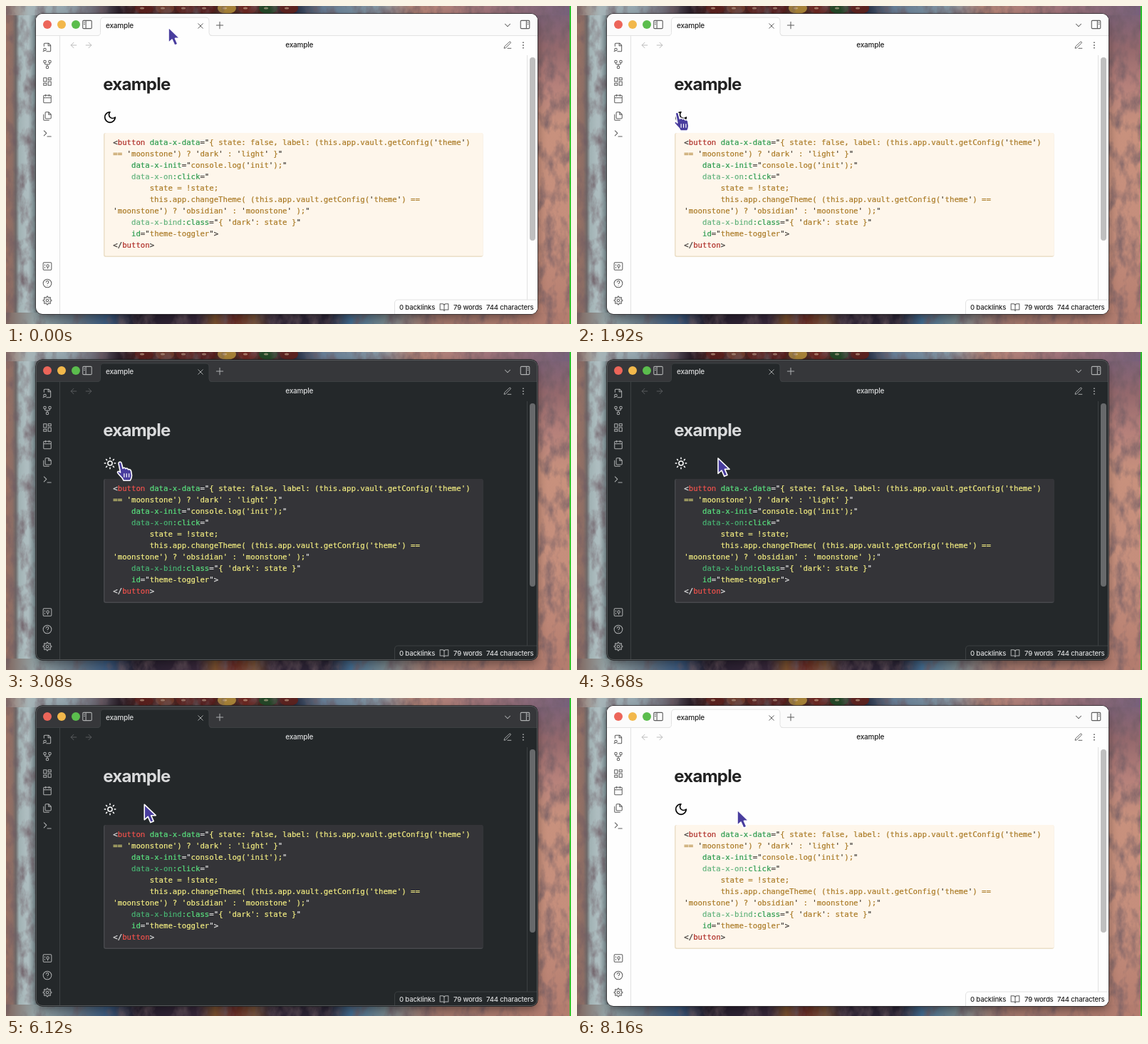
An HTML page for the animation above (8.2 s loop, 793x446 px).

```html
<!DOCTYPE html>
<html lang="en">
<head>
<meta charset="utf-8">
<title>Theme toggle</title>
<style>
html, body { margin: 0; width: 100%; height: 100%; overflow: hidden; }
svg { position: absolute; left: 0; top: 0; width: 100vw; height: 100vh; }
#backdrop { will-change: transform; }
#app {
  --bar: #fbfbfb; --page: #fefefe; --line: #e2e2e2; --edge: #2c2a2c; --rim: none; --icon: #5c5c5c; --dim: #b8b8b8;
  --text: #222; --thumb: #bfbfbf; --code: #fef6eb; --rule: #ebdfc8; --punct: #3c3836;
  --tag: #ae2b25; --attr: #299a4c; --ns: #62b37c; --string: #aa7a25; --quote: #453a2c; --ink: #000;
}
#app.dark {
  --bar: #36373a; --page: #24282a; --line: #3c4042; --edge: #17191a; --rim: #55585a; --icon: #aeb0b1; --dim: #5b5f61;
  --text: #dadbdc; --thumb: #67696b; --code: #343438; --rule: #47484c; --punct: #e4e4e4;
  --tag: #f2524c; --attr: #5ae27f; --ns: #48b573; --string: #f4ee82; --quote: #f4ee82; --ink: #fff;
}
text { fill: var(--text); font-family: Inter, "Liberation Sans", sans-serif; white-space: pre; }
.ui { font-size: 10px; font-weight: 500; letter-spacing: -.2px; }
.status { font-size: 9.5px; letter-spacing: -.15px; }
.title { font-size: 24px; font-weight: 700; letter-spacing: -.75px; }
.code text { font: 10.68px "DejaVu Sans Mono", monospace; }
.code tspan { fill: currentColor; stroke: currentColor; stroke-width: .2; }
.punct { color: var(--punct); } .tag { color: var(--tag); } .attr { color: var(--attr); }
.ns { color: var(--ns); } .string { color: var(--string); } .quote { color: var(--quote); }
.icon { fill: none; stroke: var(--icon); stroke-width: 1.75; stroke-linecap: round; stroke-linejoin: round; }
.icon.dim { stroke: var(--dim); }
.icon.ink { stroke: var(--ink); stroke-width: 2; }
.line { fill: none; stroke: var(--line); }
.bar { fill: var(--bar); } .page { fill: var(--page); }
#sun, .dark #moon { display: none; }
.dark #sun { display: inline; }
.pointer { fill: #493d9e; stroke: #fff; stroke-width: 1.6; stroke-linejoin: round; }
#click { fill: #8fb9f5; opacity: .7; }
.dark #click { fill: #1f3a62; }
</style>
</head>
<body>
<svg id="backdrop" viewBox="0 0 793 446" preserveAspectRatio="none">
  <defs>
    <linearGradient id="left">
      <stop offset="0" stop-color="#9a7163"/><stop offset=".2" stop-color="#8c6e65"/>
      <stop offset=".3" stop-color="#6d6867"/><stop offset=".4" stop-color="#a1b2b4"/>
      <stop offset=".68" stop-color="#b2c1c4"/><stop offset=".85" stop-color="#8c9fa3"/>
      <stop offset="1" stop-color="#5d686c"/>
    </linearGradient>
    <linearGradient id="right" x2="0" y2="1">
      <stop offset="0" stop-color="#76607a"/><stop offset=".13" stop-color="#93686c"/>
      <stop offset=".25" stop-color="#b5807a"/><stop offset=".38" stop-color="#c8917d"/>
      <stop offset=".7" stop-color="#c58e7c"/><stop offset="1" stop-color="#b47d6f"/>
    </linearGradient>
    <linearGradient id="top">
      <stop offset="0" stop-color="#95776c"/><stop offset=".04" stop-color="#a6b4b7"/>
      <stop offset=".11" stop-color="#93a4ad"/><stop offset=".16" stop-color="#6a6570"/>
      <stop offset=".2" stop-color="#2a1f29"/><stop offset=".24" stop-color="#4a211f"/>
      <stop offset=".47" stop-color="#4b2822"/><stop offset=".51" stop-color="#242b40"/>
      <stop offset=".56" stop-color="#647c94"/><stop offset=".66" stop-color="#8497a4"/>
      <stop offset=".72" stop-color="#b98777"/><stop offset=".85" stop-color="#a0747a"/>
      <stop offset="1" stop-color="#76607a"/>
    </linearGradient>
    <linearGradient id="bottom">
      <stop offset="0" stop-color="#80665e"/><stop offset=".05" stop-color="#94a3a5"/>
      <stop offset=".13" stop-color="#5f7080"/><stop offset=".18" stop-color="#38597f"/>
      <stop offset=".23" stop-color="#261f2e"/><stop offset=".34" stop-color="#37273a"/>
      <stop offset=".37" stop-color="#78502f"/><stop offset=".4" stop-color="#66251f"/>
      <stop offset=".44" stop-color="#785236"/><stop offset=".47" stop-color="#2d2133"/>
      <stop offset=".57" stop-color="#2b2536"/><stop offset=".61" stop-color="#426a8d"/>
      <stop offset=".67" stop-color="#75868c"/><stop offset=".75" stop-color="#a0766b"/>
      <stop offset="1" stop-color="#b47d6f"/>
    </linearGradient>
    <filter id="soft" x="-10%" y="-10%" width="120%" height="120%"><feGaussianBlur stdDeviation="7"/></filter>
    <filter id="paint" x="0" y="0" width="100%" height="100%">
      <feTurbulence type="fractalNoise" baseFrequency=".07 .04" numOctaves="4" seed="4"/>
      <feColorMatrix values="0 0 0 0 .15  0 0 0 0 .1  0 0 0 0 .12  1.6 0 0 0 -.65"/>
    </filter>
  </defs>
  <rect width="793" height="446" fill="#655c60"/>
  <rect width="46" height="446" fill="url(#left)"/>
  <rect x="742" width="51" height="446" fill="url(#right)"/>
  <rect width="793" height="13" fill="url(#top)"/>
  <rect y="430" width="793" height="16" fill="url(#bottom)"/>
  <g id="beads"></g>
  <rect width="793" height="446" filter="url(#paint)"/>
  <rect x="42" y="16" width="704" height="421" rx="10" opacity=".38" filter="url(#soft)"/>
  <path d="M792 0V446" stroke="#18d51c" stroke-width="1.6"/>
</svg>

<svg id="app" viewBox="0 0 793 446" preserveAspectRatio="none">
  <clipPath id="frame"><rect x="42" y="11" width="704" height="421" rx="9"/></clipPath>
  <rect x="41.3" y="10.3" width="705.4" height="422.4" rx="9.7" fill="var(--edge)"/>
  <g clip-path="url(#frame)">
    <rect class="page" x="42" y="11" width="704" height="421"/>
    <rect class="bar" x="42" y="11" width="704" height="30"/>
    <path class="line" d="M42 41.5H746M75.5 41V432M731.5 69V412"/>
    <path class="page" d="M128 42q4 0 4-4V21q0-5 5-5H280q5 0 5 5V38q0 4 4 4Z"/>
    <path class="line" d="M128 41.5q4.500 0 4.500-4V21q0-5 5-5H280q5 0 5 5V37.500q0 4 4 4"/>
    <rect x="735" y="72" width="8" height="257" rx="4" fill="var(--thumb)"/>
    <path class="page" d="M545.500 433V417q0-5 5-5H747V433Z"/>
    <path class="line" d="M545.500 433V417q0-5 5-5H747"/>
  </g>
  <rect x="42.500" y="11.500" width="703" height="420" rx="8.500" fill="none" stroke="var(--rim)"/>
  <g>
    <circle cx="58" cy="26" r="6" fill="#ec6559"/>
    <circle cx="78" cy="26" r="6" fill="#f2b84b"/>
    <circle cx="98" cy="26" r="6" fill="#5bbd4d"/>
  </g>
  <g id="icons"></g>

  <text class="ui" x="140" y="31.300">example</text>
  <text class="ui" x="411.700" y="58.300" text-anchor="middle">example</text>
  <text class="title" x="136.300" y="118">example</text>
  <text class="ui status" x="552" y="426">0 backlinks</text>
  <text class="ui status" x="628" y="426">79 words</text>
  <text class="ui status" x="674" y="426">744 characters</text>

  <rect x="137" y="178" width="532.500" height="174" rx="3" fill="var(--rule)"/>
  <rect x="138.500" y="178" width="531" height="172.500" rx="2" fill="var(--code)"/>
  <g class="code" id="code"></g>

  <circle id="click" r="10"/>
  <g id="toggle"></g>
  <path class="pointer" id="arrow" d="M0 0V21.500L5 17 8.700 25.300 13 23.500 9.400 15.400H16Z"/>
  <g class="pointer" id="hand">
    <path d="M-1 2C-1.500-1 2.500-1.500 3.200 1.500L5 8.500Q7 6.500 8.800 9 11.300 7.500 12.500 10.200 15.700 9.200 16.600 12.500L17.500 18.500Q17.500 22 15.300 25.500H6Q3.700 21 1 18.800L-2.200 15C-3.500 12.700-.7 11.500 1.500 14.300Z"/>
    <path d="M6.800 15.500V21M10.200 15.500V21M13.600 15.500V21" stroke-width="1.200"/>
  </g>
</svg>
<script>
const $ = id => document.getElementById(id);
const SVG = 'http://www.w3.org/2000/svg';

function add(parent, tag, attrs = {}, text = '') {
  const el = document.createElementNS(SVG, tag);
  for (const name in attrs) el.setAttribute(name, attrs[name]);
  el.textContent = text;
  return parent.appendChild(el);
}

// Icons are drawn on a 24-unit grid and centred on (x, y).
function icon(x, y, d, size = 14, kind = '', parent = $('icons')) {
  const k = size / 24;
  return add(parent, 'path', {
    class: 'icon ' + kind, d,
    transform: `translate(${x - 12 * k} ${y - 12 * k}) scale(${k})`
  });
}

const ring = (x, y, r) => `M${x - r} ${y}a${r} ${r} 0 1 0 ${2 * r} 0a${r} ${r} 0 1 0 ${-2 * r} 0`;
const box = (x, y, w, h) => `M${x + 2} ${y}h${w - 4}q2 0 2 2v${h - 4}q0 2-2 2h${4 - w}q-2 0-2-2v${4 - h}q0-2 2-2z`;
const radial = (n, fn) => Array.from({ length: n }, (_, i) => fn(i * 2 * Math.PI / n));
const polar = (a, r) => `${12 + r * Math.cos(a)} ${12 + r * Math.sin(a)}`;

const gear = 'M' + radial(96, a => polar(a, 8.6 + 1.5 * Math.tanh(2.5 * Math.cos(8 * a)))).join('L') + 'Z' + ring(12, 12, 3);
const rays = radial(8, a => `M${polar(a, 8)}L${polar(a, 10)}`).join('');

const ribbon = [
  [58, 'M4 9V4q0-2 2-2h9l5 5v13q0 2-2 2h-8M14 2v6h6M2 22l2-2' + ring(6, 17, 3)],
  [82, ring(6, 5, 3) + ring(18, 5, 3) + ring(12, 19, 3) + 'M6 8v2q0 2 2 2h8q2 0 2-2V8M12 12v4'],
  [106, 'M3 3h7v9H3zM14 3h7v5h-7zM14 12h7v9h-7zM3 16h7v5H3z'],
  [130, box(3, 4, 18, 18) + 'M16 2v4M8 2v4M3 10h18'],
  [154.500, 'M15 2H9q-2 0-2 2v12q0 2 2 2h10q2 0 2-2V8zM15 2v6h6M3 8v12q0 2 2 2h11'],
  [179, 'M4 17l6-6-6-6M12 19h9'],
  [365, box(2, 3, 20, 18) + ring(13, 11, 3) + 'M13 14v3M6 8v2M6 14v2'],
  [389, ring(12, 12, 10) + 'M9 9q.5-3 3-3 3 0 3 3 0 2-3 4M12 17v.1'],
  [413, gear]
];
ribbon.forEach(([y, d]) => icon(58, y, d));

icon(114, 26, box(2, 3, 20, 18) + 'M9 3v18M5 7h1M5 11h1', 15);
icon(728.500, 26, box(2, 3, 20, 18) + 'M15 3v18M18 7h1M18 11h1', 15);
icon(273, 28, 'M6 6l12 12M18 6L6 18', 13);
icon(300, 27, 'M4 12h16M12 4v16', 14);
icon(704, 27, 'M6 9l6 6 6-6', 14);
icon(95, 55, 'M19 12H5M12 19l-7-7 7-7', 13, 'dim');
icon(116, 55, 'M5 12h14M12 5l7 7-7 7', 13, 'dim');
icon(704, 55, 'M12 20h9M16.500 3.500q1.500-1.500 3 0t0 3L7 19l-4 1 1-4z', 13);
icon(726, 55, ring(12, 5, 1) + ring(12, 12, 1) + ring(12, 19, 1), 13);
icon(615, 422.500, 'M2 4h6q4 0 4 4v13q0-3-3-3H2zM22 4h-6q-4 0-4 4v13q0-3 3-3h7z', 14);

icon(146, 156, 'M12 3a6 6 0 0 0 9 9 9 9 0 1 1-9-9Z', 19.500, 'ink', $('toggle')).id = 'moon';
icon(146, 156, ring(12, 12, 4) + rays, 18.500, 'ink', $('toggle')).id = 'sun';

const beadColors = ['#59201d', '#6d3a2a', '#5e2521', '#571e1d', '#a88338', '#6b2822', '#254728', '#5c2320'];
beadColors.forEach((fill, i) => {
  const cx = 194 + i * 29;
  add($('beads'), 'ellipse', { cx, cy: 3, rx: 13, ry: 8, fill });
  add($('beads'), 'ellipse', { cx: cx - 3, cy: 3, rx: 3, ry: 1.5, fill: '#e2c8a9', opacity: .5 });
});

const source = `<button data-x-data="{ state: false, label: (this.app.vault.getConfig('theme')
== 'moonstone') ? 'dark' : 'light' }"
    data-x-init="console.log('init');"
    data-x-on:click="
        state = !state;
        this.app.changeTheme( (this.app.vault.getConfig('theme') ==
'moonstone') ? 'obsidian' : 'moonstone' );"
    data-x-bind:class="{ 'dark': state }"
    id="theme-toggler">
</button>`;

function markupClass(token) {
  if (token === 'button') return 'tag';
  if (/^data-x-(on|bind)$/.test(token)) return 'ns';
  return /[a-z]/.test(token) ? 'attr' : 'punct';
}

let inString = false;
source.split('\n').forEach((line, row) => {
  const text = add($('code'), 'text', { x: 150.3, y: 195 + row * 16 });
  const span = (kind, token) => add(text, 'tspan', { class: kind }, token);
  for (const part of line.match(/"|'|[^"']+/g)) {
    if (part === '"') {
      inString = !inString;
      span('punct', part);
    } else if (inString) {
      span(part === "'" ? 'quote' : 'string', part);
    } else {
      for (const token of part.match(/button|data-x-(?:on|bind)(?=:)|:?[a-z-]+|[^a-z:]+/g))
        span(markupClass(token), token);
    }
  }
});

const LOOP = 8200;
const DARK = [2800, 7280];
const CLICKS = [[2520, 2920], [7000, 7400]];
// Pointer stops: time, x, y
const stops = [
  [0, 228, 30], [240, 228, 30], [1100, 118, 137], [1480, 118, 137], [2200, 150, 156],
  [2920, 150, 156], [3500, 198, 149], [6000, 198, 149], [6720, 148, 153],
  [7400, 148, 153], [8000, 225, 157], [LOOP, 225, 157]
];

function pointerAt(t) {
  const i = stops.findIndex(stop => stop[0] > t);
  const [t0, x0, y0] = stops[i - 1], [t1, x1, y1] = stops[i];
  const p = (t - t0) / (t1 - t0), e = p * p * (3 - 2 * p);
  return [x0 + (x1 - x0) * e, y0 + (y1 - y0) * e];
}

const show = (el, on) => el.setAttribute('visibility', on ? 'visible' : 'hidden');

function draw(t) {
  const [x, y] = pointerAt(t);
  const over = Math.abs(x - 146) < 16 && Math.abs(y - 156) < 14;
  $('app').classList.toggle('dark', t >= DARK[0] && t < DARK[1]);
  for (const id of ['arrow', 'hand']) $(id).setAttribute('transform', `translate(${x} ${y})`);
  show($('arrow'), !over);
  show($('hand'), over);
  $('click').setAttribute('transform', `translate(${x - 5.5} ${y - 2.5})`);
  show($('click'), CLICKS.some(([from, to]) => t >= from && t < to));
}

const start = performance.now();
function tick() {
  draw((performance.now() - start) % LOOP);
  requestAnimationFrame(tick);
}
draw(0);
requestAnimationFrame(tick);
</script>
</body>
</html>
```
